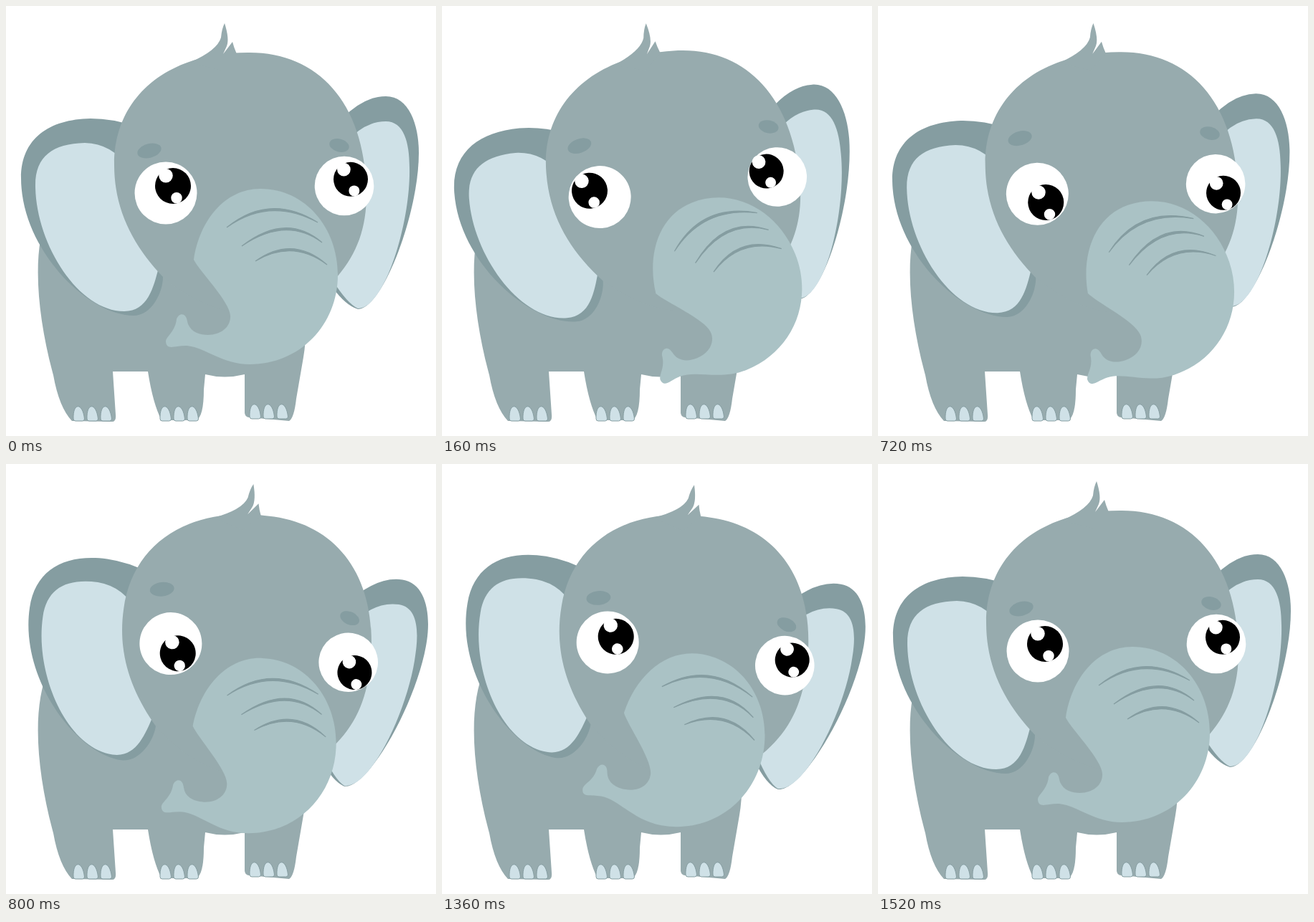
Recreate the animation shown at these times as an HTML page. Size 600 by 600 pixels, loop 1.92 s.

```html
<!DOCTYPE html>
<html lang="en">
<head>
<meta charset="utf-8">
<title>Elephant</title>
<style>
html, body { margin: 0; width: 100%; height: 100%; overflow: hidden; background: #fff; }
svg { display: block; width: 100%; height: 100%; }
</style>
</head>
<body>
<svg id="stage" viewBox="0 0 600 600"></svg>
<script>
const SKIN = '#97abae', DARK = '#859da1', PALE = '#cfe1e7', TRUNK = '#aac2c5';
const LOOP = 1920, STEP = 80;

const path = (d, fill) => `<path d="${d}" fill="${fill}"/>`;
const circle = (x, y, r, fill) => `<circle cx="${x}" cy="${y}" r="${r}" fill="${fill}"/>`;
const group = (id, content) => `<g id="${id}">${content}</g>`;

// Three equal nails side by side.
function toes(x, y) {
  let out = '';
  for (let i = 0; i < 3; i++, x += 19) {
    out += `<path d="M${x} ${y + 17}C${x - 1} ${y - 6} ${x + 13} ${y - 6} ${x + 15.5} ${y + 17}` +
      `q0 3 -3 3h-9.5q-3 0 -3 -3Z" fill="${PALE}" stroke="${DARK}"/>`;
  }
  return out;
}

// Tapered arc, thickest in the middle.
const wrinkle = (x1, y1, cx, cy, x2, y2) =>
  `<path d="M${x1} ${y1}Q${cx} ${cy} ${x2} ${y2}Q${cx} ${cy + 6} ${x1} ${y1}Z"
    fill="${DARK}" stroke="${DARK}" stroke-width="1.2"/>`;

function eye(x, y, r, px, py, pr) {
  const pupil = circle(px, py, pr, '#000') +
    circle(px - pr * .4, py - pr * .57, pr * .39, '#fff') +
    circle(px + pr * .2, py + pr * .67, pr * .31, '#fff');
  return circle(x, y, r, '#fff') + `<g class="pupil">${pupil}</g>`;
}

const brow = (id, x, y, rx, ry, tilt) => group(id,
  `<ellipse rx="${rx}" ry="${ry}" fill="${DARK}" transform="translate(${x} ${y}) rotate(${tilt})"/>`);

const body =
  path(`M60 285C35 340 43 430 66 515Q74 560 92 579L148 580Q154 580 153 570L149 510H198
    Q205 555 217 578H265Q276 574 276 535L278 514Q305 521 333 514V568Q334 574 340 574L395 579
    Q402 575 405 548L415 490Q422 450 415 380L300 250H150Z`, SKIN) +
  toes(94, 559) + toes(215, 559) + toes(340, 556);

const ears =
  path(`M180 168Q150 157 118 157C60 158 21 185 21 240C21 340 115 432 178 432
    C203 432 219 400 219 378L240 300Z`, DARK) +
  path(`M170 225Q148 192 110 191C65 192 41 210 41 250C41 330 100 426 165 426
    C198 426 206 392 213 365L240 300Z`, PALE) +
  path(`M470 156Q500 126 530 126C562 126 576 165 576 205C576 290 525 423 491 423
    Q474 418 455 392L440 300Z`, DARK) +
  path(`M475 190Q500 161 530 161C555 161 563 190 563 225C565 300 529 422 491 422
    Q476 415 456 383L440 300Z`, PALE);

const skull =
  path(`M340 65C436 65 502 136 503 262C503 310 490 345 462 378Q340 480 219 378
    C178 335 151 285 151 222C150 128 224 64 340 65Z`, SKIN) +
  path('M256 79Q295 62 300 44Q301 32 305 24Q312 46 308 56L303 67Q310 58 316 50Q318 58 322 67L300 90Z', SKIN);

const face =
  brow('browL', 200, 202, 17, 9.8, -15) + brow('browR', 465, 194.5, 14, 9, 15) +
  eye(223, 261, 43.5, 233, 251, 25) + eye(472, 251, 41.3, 481, 241.8, 24);

const trunk =
  path(`M262 354C270 300 305 255 355 255C418 255 463 310 463 375C463 445 410 500 340 500
    C300 500 275 474 250 474C235 474 224 481 223 468C224 460 236 455 238 437
    C241 428 251 427 253 440C256 455 270 459 282 459C300 459 314 448 313 432
    C312 412 270 370 262 354Z`, TRUNK) +
  wrinkle(308, 309, 368, 260, 435, 302) +
  wrinkle(329, 335, 391, 287, 441, 330) +
  wrinkle(348, 356, 400, 319, 448, 361);

const stage = document.getElementById('stage');
stage.innerHTML = body + group('head', ears + skull + face + group('trunk', trunk));

const pupils = stage.querySelectorAll('.pupil');
const move = (id, transform) => document.getElementById(id).setAttribute('transform', transform);

// Each move takes three held steps: rest to up, up to down, down to rest.
const ease = n => (1 - Math.cos(Math.PI * Math.min(1, Math.max(0, n / 3)))) / 2;
const track = (k, up, down, lag = 0) =>
  up * (ease(k) - ease(k - 8 - lag)) + down * (ease(k - 8) - ease(k - 16));

function gaze(k) {
  if (k < 1 || k >= 17) return '0 0';
  return k < 9 ? '-23.5 .2' : '1.7 22';
}

function draw(ms) {
  let k = Math.floor((ms % LOOP) / STEP);
  if (k > 11 && k < 17) k = 11;
  move('head', `rotate(${track(k, -5.55, 12.95)} 298 303)`);
  move('trunk', `rotate(${track(k, -23.5, 0)} 428 283)`);
  move('browL', `translate(0 ${track(k, -19, 0, 1)})`); // drops one step late
  move('browR', `translate(0 ${track(k, -19, 0)})`);
  for (const p of pupils) p.setAttribute('transform', `translate(${gaze(k)})`);
}

let start;
function tick(now) {
  start ??= now;
  draw(Math.max(0, now - start));
  requestAnimationFrame(tick);
}
draw(0);
requestAnimationFrame(tick);
</script>
</body>
</html>
```
